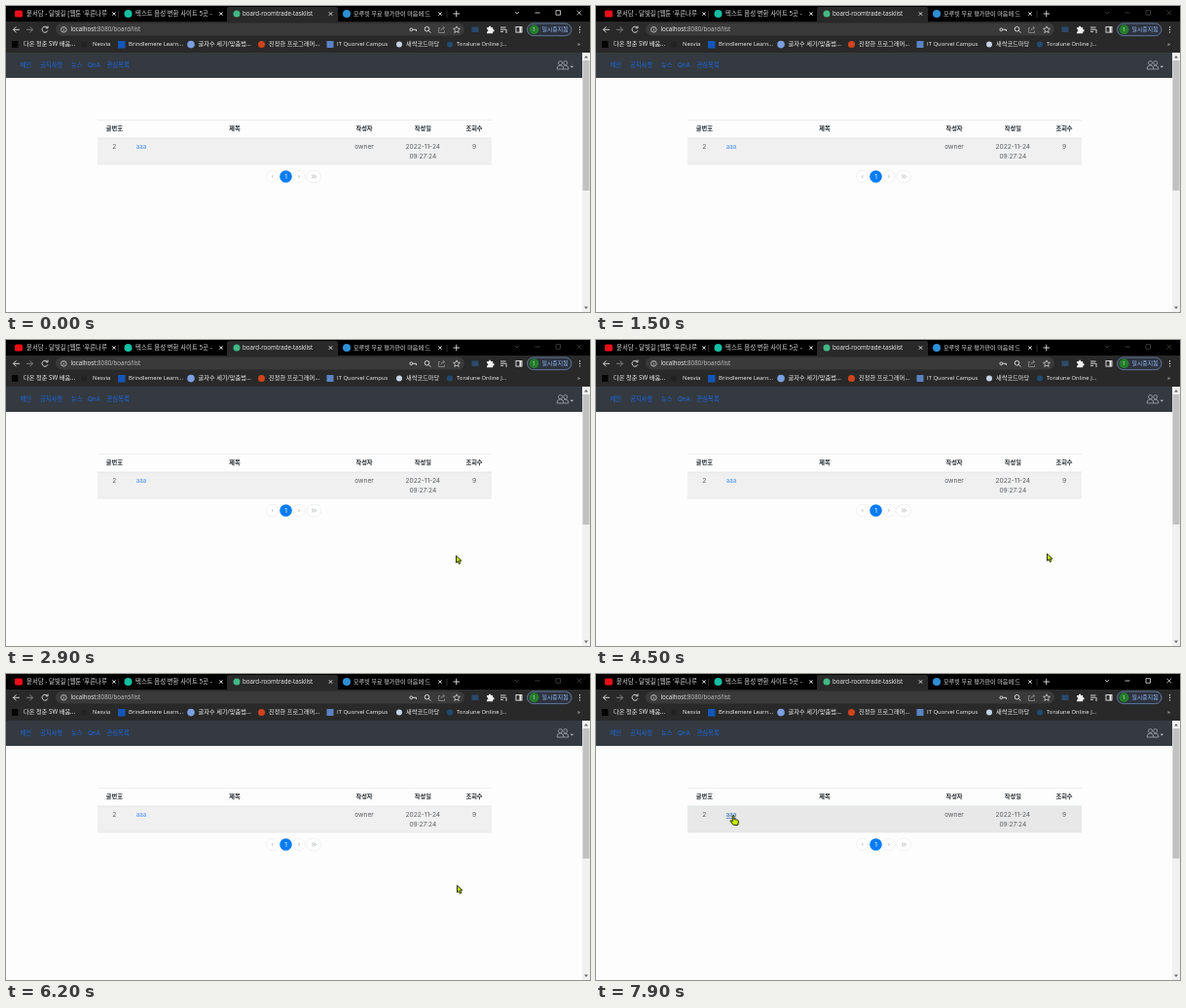
Write an HTML page that moves like this. It is 600 by 315 pixels and loops after 8000 ms.

```html
<!DOCTYPE html>
<html lang="ko">
<head>
<meta charset="utf-8">
<style>
html, body { margin: 0; height: 100%; overflow: hidden; background: #fdfdfd; }
svg { display: block; width: 100vw; height: 100vh; }
text { white-space: pre; }
.ui { font: 500 6.2px "Open Sans", "Noto Sans CJK KR", sans-serif; fill: #f4f4f4; }
.tab { fill: #dedede; }
.ko { font-size: 6.4px; }
.mark { font-size: 5.9px; }
.icon { fill: none; stroke: #e6e6e6; stroke-width: .9; }
.dim { stroke: #88898b; }
.page { font: 6.6px Inter, "Noto Sans CJK KR", sans-serif; fill: #565a5f; }
.nav { font-size: 6.3px; fill: #1a68e6; }
.head { font-size: 6.2px; font-weight: bold; fill: #24292e; }
.mid { text-anchor: middle; }
#link { fill: #3f8ff0; }
#link.hover { fill: #2467b8; text-decoration: underline; }
#controls { stroke: #444; }
#controls.active { stroke: #e6e6e6; }
</style>
</head>
<body>
<svg viewBox="0 0 600 315" preserveAspectRatio="none">
  <rect width="600" height="315" fill="#fdfdfd"/>
  <!-- tab strip -->
  <rect width="600" height="16" fill="#000"/>
  <path d="M227 16V3q0-2 2-2h110q2 0 2 2v13z" fill="#292929"/>
  <path d="M115.500 5v7M453 5v7" stroke="#444" stroke-width=".7"/>
  <rect x="9" y="4.500" width="8" height="7" rx="1.500" fill="#f00d18"/>
  <circle cx="125.500" cy="8" r="4" fill="#13bfa3"/>
  <circle cx="237" cy="8" r="3.500" fill="#41b883"/>
  <circle cx="350" cy="8" r="4" fill="#2d8fd5"/>
  <g class="ui">
    <g class="tab ko">
      <text x="21" y="10.300">윤서담 - 달빛길 [웹툰 '푸른나루</text>
      <text x="133" y="10.300">텍스트 음성 변환 사이트 5곳 -</text>
      <text x="357" y="10.300" style="font-size:6.100px">모루빗 무료 평가판이 마음에 드</text>
    </g>
    <text x="243" y="10.300">board-roomtrade-tasklist</text>
  </g>
  <g id="closers" class="icon"></g>
  <path class="icon" d="M459.500 8h6.500M462.750 4.700v6.600"/>
  <g id="controls" fill="none" stroke-width=".8">
    <path d="M523 6l2 2 2-2M543.500 7h5M565 4.700h4.500v4.500H565zM586.500 4.700l4.600 4.600m0-4.600l-4.600 4.600"/>
  </g>

  <!-- toolbar -->
  <rect y="16" width="600" height="32" fill="#292929"/>
  <rect x="51" y="17.500" width="420" height="13" rx="6.500" fill="#3a3a3a"/>
  <g class="icon">
    <path d="M14 24.300H7.500M10.500 21.300l-3 3 3 3"/>
    <path class="dim" d="M21 24.300h6.500m-3-3l3 3-3 3"/>
    <path d="M42.400 22.300a3 3 0 1 0 .5 3M43 20.500v2.300h-2.300"/>
    <circle cx="59.300" cy="24.300" r="2.800" stroke-width=".7"/>
    <path d="M59.300 23.800v2M59.300 22.400v.7" stroke-width=".7"/>
    <circle cx="416.300" cy="24.300" r="1.400"/>
    <path d="M417.700 24.300h3.800v1.700"/>
    <circle cx="432.500" cy="23.700" r="2.300"/>
    <path d="M434.200 25.400l2.200 2.200"/>
    <path class="dim" d="M446 22.500h-1.500v5h6v-2M446.700 25.300q.3-2.800 3.800-2.800m-1.700-1.700l1.900 1.700-1.900 1.700"/>
    <path d="M463 20.800l1 2.300 2.500.2-1.900 1.700.6 2.500-2.200-1.400-2.200 1.400.6-2.500-1.900-1.700 2.500-.2z" stroke-width=".7"/>
    <path d="M508 22h5.500M508 24.200h5.500M508 26.400h3M514 24v4"/>
    <rect x="524" y="21.500" width="6" height="5.600"/>
    <path d="M528.500 21.500v5.600" stroke-width="2"/>
  </g>
  <rect x="478.500" y="21.500" width="7" height="5.500" fill="#2b4a6c"/>
  <path d="M494 22h2q0-1.500 1.100-1.500T498.200 22h2v2q1.500 0 1.500 1.200t-1.500 1.200v1.800H494v-1.800q1.300 0 1.300-1.200T494 24z" fill="#f0f0f0"/>
  <rect x="535.500" y="18" width="45.500" height="12.600" rx="6.300" fill="#2d333e" stroke="#7695c6" stroke-width=".7"/>
  <circle cx="542.500" cy="24.300" r="5" fill="#257d2c"/>
  <g fill="#e6e6e6"><circle cx="589.500" cy="21.700" r=".7"/><circle cx="589.500" cy="24.300" r=".7"/><circle cx="589.500" cy="26.900" r=".7"/></g>
  <g class="ui">
    <text x="66.500" y="26.300">localhost<tspan fill="#c2c2c2">:8080/board/list</tspan></text>
    <text class="mid" x="542.500" y="26.300" style="font-size:5px">1</text>
    <text x="550.500" y="26.300" style="font-size:5.900px;fill:#93b7f4">일시중지됨</text>
  </g>

  <!-- bookmarks -->
  <rect x="6" y="36" width="6.500" height="7" fill="#050505"/>
  <circle cx="80" cy="39.500" r="3" fill="#222"/>
  <rect x="115" y="36" width="7.500" height="7.500" fill="#1257b8"/>
  <circle cx="190" cy="39.600" r="3.800" fill="#7b9fdf"/>
  <circle cx="262.500" cy="39.500" r="3.500" fill="#d0441c"/>
  <rect x="329.500" y="36" width="7" height="7" fill="#5b83c4"/>
  <circle cx="404" cy="39.500" r="3" fill="#c4d3e5"/>
  <circle cx="456" cy="39.500" r="3" fill="#214a70"/>
  <g class="ui mark">
    <text x="18" y="41.300" style="font-size:6.200px">다온 청춘 SW 배움...</text>
    <text x="89" y="41.300">Nesvia</text>
    <text x="126" y="41.300">Brindlemere Learn...</text>
    <text x="197.500" y="41.300" style="font-size:6.200px">글자수 세기/맞춤법...</text>
    <text x="270" y="41.300" style="font-size:6.200px">진정한 프로그래머...</text>
    <text x="340" y="41.300">IT Quorvel Campus</text>
    <text x="411" y="41.300" style="font-size:6.200px">새싹코드마당</text>
    <text x="463" y="41.300">Toralune Online J...</text>
    <text x="587" y="41.300">»</text>
  </g>

  <!-- page -->
  <rect y="48" width="592" height="26" fill="#343a40"/>
  <g class="page nav">
    <text x="14.500" y="63">메인</text>
    <text x="35" y="63">공지사항</text>
    <text x="67" y="63">뉴스</text>
    <text x="84" y="63">QnA</text>
    <text x="103.500" y="63">관심목록</text>
  </g>
  <g class="icon" style="stroke:#b4b7ba;stroke-width:.7">
    <circle cx="569.500" cy="58.600" r="2"/>
    <circle cx="574.700" cy="58.600" r="2"/>
    <path d="M566 65q0-4 3.500-4t3.500 4zM573 61.700q1-.5 1.700-.5 3.300 0 3.300 3.800h-5"/>
  </g>
  <path d="M579.700 61.800h3.400l-1.700 1.700z" fill="#c4c6c8"/>
  <rect x="592" y="48" width="8" height="267" fill="#f1f1f1"/>
  <rect x="592.500" y="56" width="7" height="134" fill="#c1c1c1"/>
  <path d="M594 53.500l2-2.500 2 2.500zM594 309.500l2 2.500 2-2.500z" fill="#656565"/>

  <rect id="row" x="94" y="136" width="405" height="27"/>
  <path d="M94 117.500h405M94 163.200h405" stroke="#e4e6e8" stroke-width=".6"/>
  <path d="M94 136h405" stroke="#dee2e6" stroke-width=".8"/>
  <g class="page head mid">
    <text x="111.300" y="128.400">글번호</text>
    <text x="235" y="128.400">제목</text>
    <text x="368" y="128.400">작성자</text>
    <text x="428.300" y="128.400">작성일</text>
    <text x="481" y="128.400">조회수</text>
  </g>
  <g class="page mid">
    <text x="111.300" y="147.300">2</text>
    <text x="368" y="147.300">owner</text>
    <text x="428.300" y="147.300">2022-11-24</text>
    <text x="428.300" y="156.600">09:27:24</text>
    <text x="481" y="147.300">9</text>
  </g>
  <text id="link" class="page" x="133.700" y="147.300" style="font-size:6.200px">aaa</text>

  <g fill="#fff" stroke="#e6e8ea" stroke-width=".6">
    <circle cx="273.700" cy="175.500" r="6.200"/>
    <circle cx="301" cy="175.500" r="6.200"/>
    <rect x="308.800" y="169.300" width="15" height="12.400" rx="6.200"/>
  </g>
  <circle cx="287.500" cy="175.500" r="6.300" fill="#087cf5"/>
  <text class="page mid" x="287.500" y="178" style="fill:#fff">1</text>
  <path d="M274.500 174.400l-1.500 1.100 1.500 1.100M300.200 174.400l1.500 1.100-1.500 1.100M314 173.700l2.300 1.800-2.300 1.800M316.300 173.700l2.300 1.800-2.300 1.800" fill="none" stroke="#a0a5aa" stroke-width=".7"/>

  <g id="cursor" fill="#c6f000" stroke="#171c00" stroke-width=".9" stroke-linejoin="round">
    <path id="arrow" d="M0 0v7.300l1.700-1.500 1.200 2.700 1.400-.7-1.200-2.600h2.300z"/>
    <path id="hand" d="M-.7.500q0-1 .8-1t.8 1v3l3.500.8q1.200.3 1 1.500l-.5 3.700H.2l-3-3.700q-.5-1 .5-1.200l1.600 1z"/>
  </g>
</svg>
<script>
const $ = id => document.getElementById(id);
const LOOP = 8000, STEP = 100;

$("closers").innerHTML = [111, 221, 333.5, 446].map(x =>
  `<path d="M${x - 1.7} 6.300l3.400 3.400m0-3.400l-3.400 3.400"/>`).join("");

// pointer path: time, x, y
const path = [
  [1600, 604, 184], [1800, 528, 212], [2000, 462.5, 222], [3500, 462.5, 222],
  [4400, 463.5, 221], [4700, 463.5, 218], [6500, 463.5, 217.5],
  [6900, 182, 172], [7000, 182, 172], [7100, 174.5, 160.5],
  [7500, 141, 146], [8000, 141, 146]
];

function pointer(t) {
  const i = path.findIndex(p => p[0] > t);
  if (i < 1) return [604, 184];
  const [a, b] = [path[i - 1], path[i]];
  const k = (t - a[0]) / (b[0] - a[0]);
  return [1, 2].map(n => a[n] + (b[n] - a[n]) * k);
}

function draw(now) {
  const t = Math.floor(now % LOOP / STEP) * STEP;
  const [x, y] = pointer(t);
  const overRow = x > 94 && x < 499 && y > 136 && y < 163;
  const overLink = overRow && x > 133 && x < 145 && y < 150;
  $("cursor").setAttribute("transform", `translate(${x} ${y})`);
  $("cursor").style.display = t < 1700 ? "none" : "";
  $("arrow").style.display = overLink ? "none" : "";
  $("hand").style.display = overLink ? "" : "none";
  $("row").setAttribute("fill", overRow ? "#e8e8e8" : "#f0f0f0");
  $("link").classList.toggle("hover", overLink);
  $("controls").classList.toggle("active", t < 300 || t >= 7800);
  requestAnimationFrame(draw);
}
requestAnimationFrame(draw);
</script>
</body>
</html>
```
